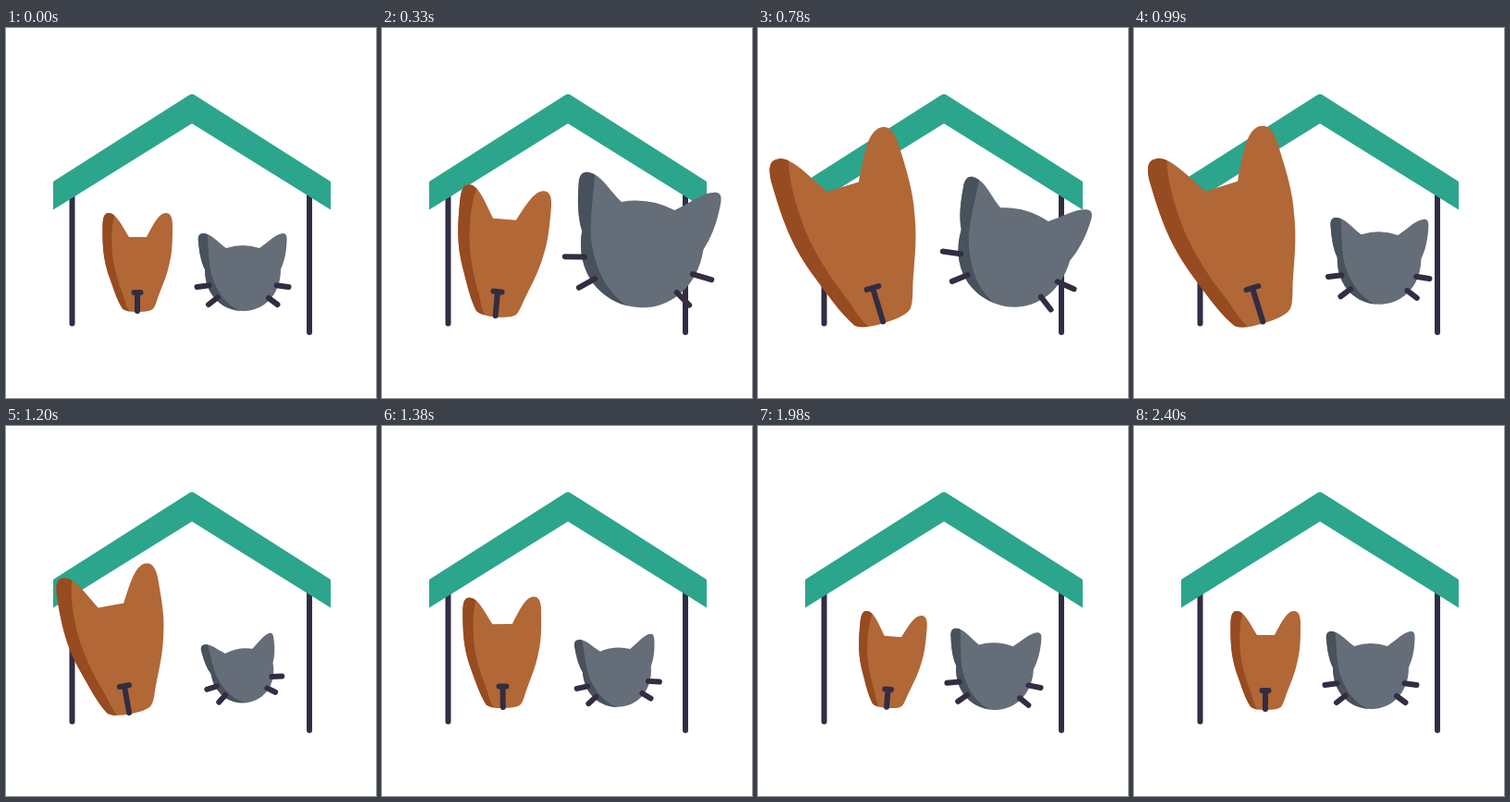
An HTML page that plays this animation: 400x400 px, repeating every 4430 ms.

```html
<!DOCTYPE html>
<html lang="en">
<head>
<meta charset="utf-8">
<title>Pet shelter</title>
<style>
  html, body { margin: 0; width: 100%; height: 100%; overflow: hidden; background: #fff; }
  svg { display: block; width: 100%; height: 100%; }
  .line { fill: none; stroke: #322d43; stroke-width: 6; stroke-linecap: round; vector-effect: non-scaling-stroke; }
</style>
</head>
<body>
<svg viewBox="0 0 400 400">
  <defs>
    <path id="catHead" d="M208 231C207 224 210 222 213 222C222 222 228 231 238 238Q256 232 274 238C284 231 291 223 299 222C303 221.5 304 225 303.5 231C303 243 301 252 297 261C297 290 277 306 257 306C235 306 215 290 215 261C211 253 209 243 208 231Z"/>
    <path id="dogHead" d="M104.500 212C105 203 107 200 111 200C119 200 125 213 133 226H152C159 213 165 200 173 200C177.500 200 180 204 180 213C180 229 180 241 177 253C174 268 170 276 164 292Q161 302 158.500 304Q155 307 142 307Q130 307 126 303.500C120 294 117 284 112 270C106 252 104 240 104.500 212Z"/>
    <clipPath id="catClip"><use href="#catHead"/></clipPath>
    <clipPath id="dogClip"><use href="#dogHead"/></clipPath>
  </defs>

  <path class="line" d="M71.5 180V319.5M328 180V329"/>
  <path fill="#2ca58d" d="M51 166L198 72.500Q201 70.500 204 72.500L351 166V196.400L201 103.200L51 196.400Z"/>

  <g id="cat">
    <use href="#catHead" fill="#656d78"/>
    <path clip-path="url(#catClip)" fill="#48525c" d="M200 215H217C219 238 219 254 222 266C229 289 241 302 256 307H200Z"/>
    <path class="line" d="M206.500 280L219.500 278.200M219 299L228.500 291.500M292.500 278.200L305.500 280M284 292L293.500 299"/>
  </g>

  <g id="dog">
    <use href="#dogHead" fill="#b16736"/>
    <path clip-path="url(#dogClip)" fill="#964b20" d="M95 195H120C113 212 114 230 115 245C117 262 122 277 127 290Q130 302 134 308H95Z"/>
    <path class="line" d="M138.500 286H145.500M142 286V306"/>
  </g>
</svg>
<script>
const LOOP = 4430, STEP = 30, REST = 2400;

// Key poses away from rest: time, shift x, shift y, turn, growth
function actor(id, x, y, ...poses) {
  const still = t => [t, 0, 0, 0, 0];
  return { el: document.getElementById(id), x, y, keys: [still(0), ...poses, still(REST)] };
}

const actors = [
  actor('dog', 142, 286,
    [330, -17, -1, 5, 0.31],
    [570, -31, -2, -3, 0.84],
    [780, -18, -5, -17, 0.9],
    [1080, -14, -5, -15.5, 0.8],
    [1200, -14, -5, -10, 0.47],
    [1650, -5, -3, 8, -0.07]),
  actor('cat', 256, 278,
    [330, 21.5, -21.5, 9, 0.62],
    [570, 17, -24, 21, 0.65],
    [780, 15.5, -19, 16, 0.49],
    [1200, 1.5, -2, -10, -0.17],
    [1650, -1.5, 0.5, 5, 0.04])
];

// Tangent at a key; flat where the motion turns back
function slope(keys, i, c) {
  if (i === 0 || i === keys.length - 1) return 0;
  const [a, b, d] = [keys[i - 1], keys[i], keys[i + 1]];
  const h0 = b[0] - a[0], h1 = d[0] - b[0];
  const s0 = (b[c] - a[c]) / h0, s1 = (d[c] - b[c]) / h1;
  return s0 * s1 <= 0 ? 0 : (s0 * h1 + s1 * h0) / (h0 + h1);
}

function sample(keys, t, c) {
  const i = Math.max(0, keys.findIndex(k => k[0] >= t) - 1);
  const a = keys[i], b = keys[i + 1], h = b[0] - a[0];
  const u = (t - a[0]) / h, v = 1 - u;
  return v * v * (1 + 2 * u) * a[c] + u * u * (1 + 2 * v) * b[c]
    + h * u * v * (v * slope(keys, i, c) - u * slope(keys, i + 1, c));
}

function draw(now) {
  const t = Math.min(REST, Math.floor((now % LOOP) / STEP) * STEP);
  for (const { el, x, y, keys } of actors) {
    const [dx, dy, turn, grow] = [1, 2, 3, 4].map(c => sample(keys, t, c));
    el.setAttribute('transform',
      `translate(${x + dx} ${y + dy}) rotate(${turn}) scale(${1 + grow}) translate(${-x} ${-y})`);
  }
}

let start;
function tick(now) {
  start ??= now;
  draw(Math.max(0, now - start));
  requestAnimationFrame(tick);
}
draw(0);
requestAnimationFrame(tick);
</script>
</body>
</html>
```
